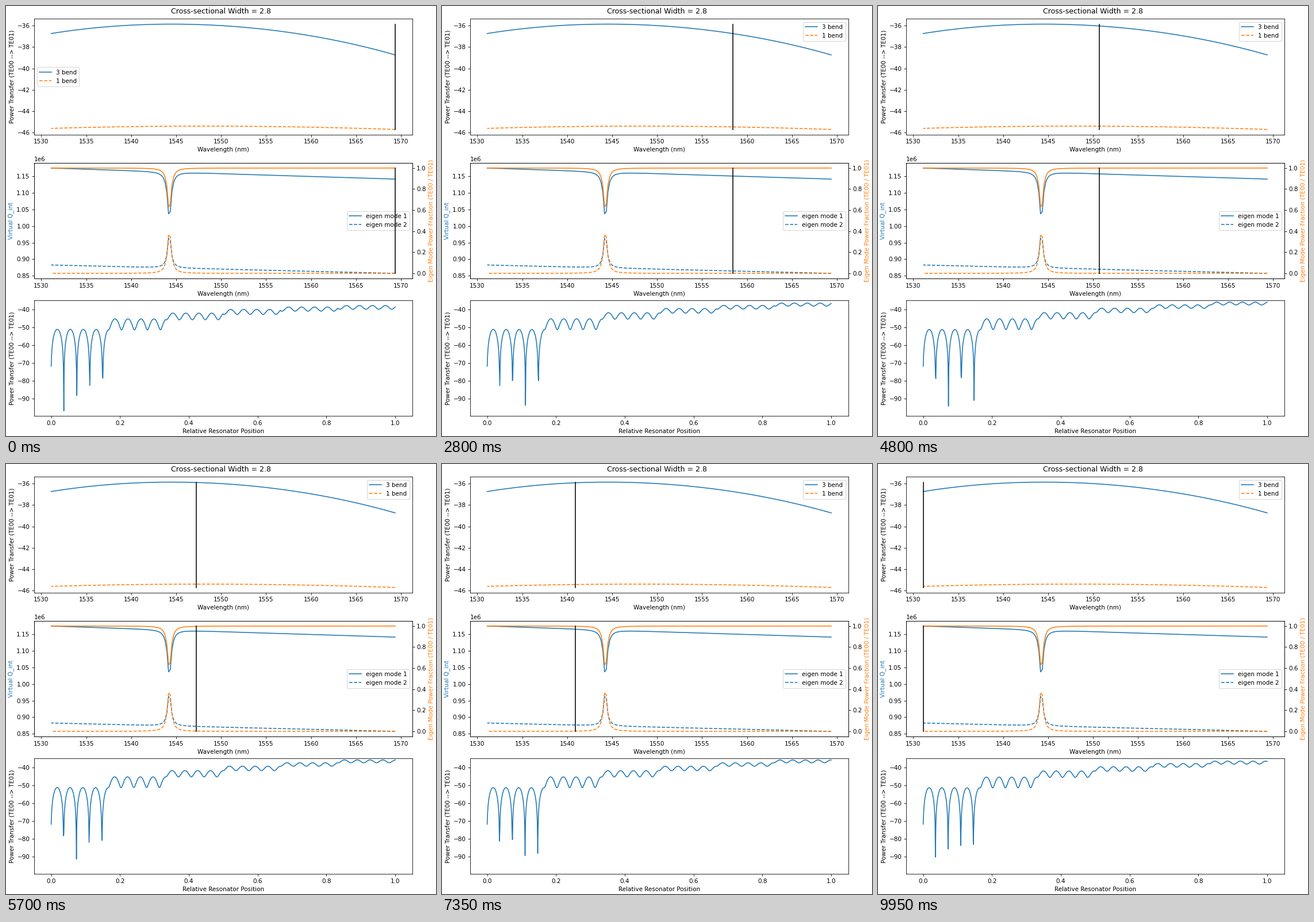
These frames come from a looping animation (748x748 px, 10 s). A matplotlib script:

```python
import numpy as np
import matplotlib.pyplot as plt
from matplotlib.animation import FuncAnimation

FRAMES, INTERVAL = 200, 50
STEPS, ARCS = 150, 6          # samples per arc, arcs in three bends
BLUE, ORANGE = "tab:blue", "tab:orange"

# Sweep evenly spaced in frequency, from long to short wavelength.
sweep = np.linspace(0, 1, FRAMES)
wavelength = 1 / ((1 - sweep) / 1569.36 + sweep / 1531.1)


def transfer(t, wl):
    """Power (dB) in TE01 along arcs of alternating curvature."""
    period = 33.9713 - 0.8363 * t
    chirp = 0.0213 - 0.0033 * t
    n = np.arange(1, STEPS + 1)
    cycles = n / period + chirp * n**2 / period**3
    turn = np.exp(2j * np.pi * cycles)
    drift = 0.00477 * cycles  # keeps the nulls finite
    amp, path = 0, []
    for arc in range(ARCS):
        center = 0.5 * (-1) ** arc
        field = center * (1 - drift) + (amp - center) * turn
        amp = field[-1]
        path.append(field)
    level = -51.33 + 0.0059 * (wl - 1544.4)
    return level + 20 * np.log10(np.abs(np.concatenate(path)))


paths = np.array([transfer(t, wl) for t, wl in zip(sweep, wavelength)])
three_bend = paths[:, -1]
one_bend = paths[:, 2 * STEPS - 1]

# Two modes mixing around their crossing.
detune = np.abs(wavelength - 1544.24)
minor = 0.5 * (1 - detune / np.hypot(detune, 0.32))
major = 1 - minor
q_a = np.interp(sweep, [0, 1], [1.1417e6, 1.1752e6])
q_b = np.interp(sweep, [0, 1], [0.857e6, 0.8823e6])
q_first = 1 / (major / q_a + minor / q_b)
q_second = 1 / (minor / q_a + major / q_b)

fig, (top, mid, low) = plt.subplots(
    3, 1, figsize=(10, 10), dpi=74.8, layout="constrained")
fig.suptitle("Cross-sectional Width = 2.8")

top.plot(wavelength, three_bend, color=BLUE, label="3 bend")
top.plot(wavelength, one_bend, "--", color=ORANGE, label="1 bend")
span = [one_bend.min(), three_bend.max()]
top_mark, = top.plot([wavelength[0]] * 2, span, color="black")
top.set_xlabel("Wavelength (nm)")
top.set_ylabel("Power Transfer (TE00 --> TE01)")
top.legend(loc="best")

mid.plot(wavelength, q_first, color=BLUE, label="eigen mode 1")
mid.plot(wavelength, q_second, "--", color=BLUE, label="eigen mode 2")
mid.set_xlabel("Wavelength (nm)")
mid.set_ylabel("Virtual Q_int", color=BLUE)
mid.legend(loc="center right")

twin = mid.twinx()
twin.plot(wavelength, major, color=ORANGE)
twin.plot(wavelength, minor, "--", color=ORANGE)
mid_mark, = twin.plot([wavelength[0]] * 2, [0, 1], color="black")
twin.set_ylabel("Eigen Mode Power Fraction (TE00 / TE01)", color=ORANGE)

position = np.linspace(0, 1, STEPS * ARCS)
trace, = low.plot(position, paths[0], color=BLUE)
low.set_xlabel("Relative Resonator Position")
low.set_ylabel("Power Transfer (TE00 --> TE01)")

# Settle the layout once, then keep it fixed.
fig.canvas.draw()
fig.set_layout_engine("none")


def update(i):
    for mark in (top_mark, mid_mark):
        mark.set_xdata([wavelength[i]] * 2)
    trace.set_ydata(paths[i])
    return top_mark, mid_mark, trace


anim = FuncAnimation(fig, update, frames=FRAMES, interval=INTERVAL, repeat=True)
plt.show()
```
